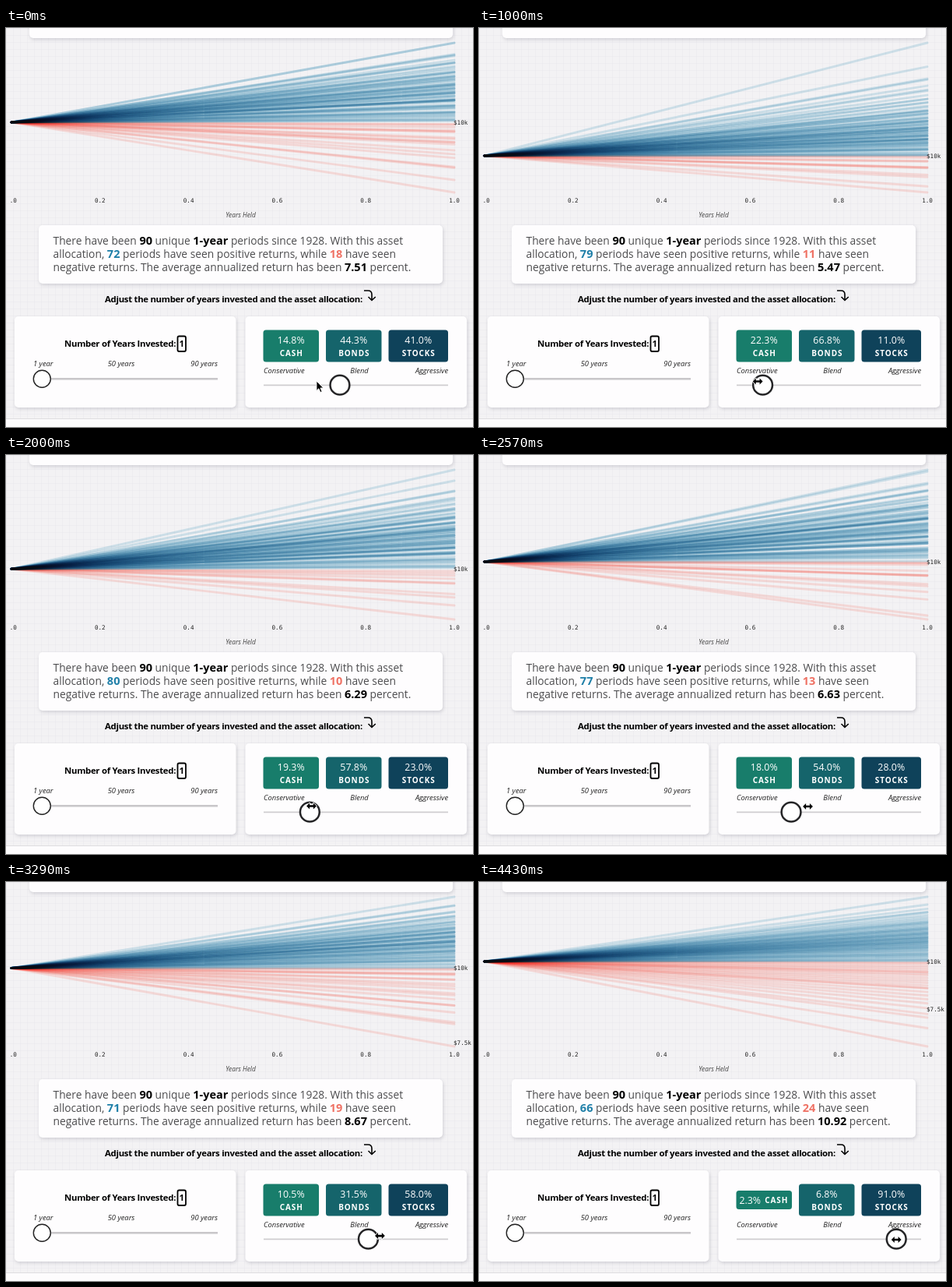
An HTML page for the animation above (4.57 s loop, 600x512 px).

```html
<!DOCTYPE html>
<html lang="en">
<head>
<meta charset="utf-8">
<title>Returns by asset allocation</title>
<style>
html, body { margin: 0; width: 100%; height: 100%; overflow: hidden; background: #f3f2f4; }
svg { display: block; width: 600px; height: 512px; font-family: "Open Sans", "Noto Sans", sans-serif; }
text { white-space: pre; }
.card { fill: #fefdfe; filter: drop-shadow(1px 2px 2px rgba(40, 40, 60, .16)); }
.mono { font: 7.6px "DejaVu Sans Mono", monospace; fill: #222; }
.ital { font-size: 9.4px; font-style: italic; fill: #222; }
.head { font-size: 11.4px; font-weight: 700; letter-spacing: -.3px; }
.para { font-size: 13.8px; fill: #4c4c4e; }
.para tspan { font-size: 14.5px; font-weight: 700; fill: #000; }
.para .up { fill: #1f7fa8; }
.para .down { fill: #ef7265; }
.mid { text-anchor: middle; }
.end { text-anchor: end; }
.pct { font-size: 12.4px; fill: #fff; text-anchor: middle; }
.name { font-size: 10px; font-weight: 700; letter-spacing: .9px; fill: #fff; text-anchor: middle; }
.ray { mix-blend-mode: multiply; fill: none; stroke-width: 2.9; stroke-linecap: round; stroke-opacity: .18; }
.ink { fill: none; stroke: #000; stroke-width: 1.6; }
</style>
</head>
<body>
<svg viewBox="0 0 600 512">
  <defs>
    <pattern id="grid" width="9" height="9" patternUnits="userSpaceOnUse">
      <path d="M0 .5H9M.5 0V9" stroke="#667" stroke-opacity=".03" fill="none"/>
    </pattern>
    <clipPath id="edge"><rect x="5" y="210" width="595" height="20"/></clipPath>
  </defs>
  <rect width="600" height="512" fill="#f3f2f4"/>
  <rect width="600" height="502" fill="url(#grid)"/>
  <rect y="502" width="600" height="10" fill="#fdfcfd"/>
  <path d="M0 501.5H600" stroke="#dedde0"/>

  <g id="rays"></g>
  <g id="axis" class="mono mid" clip-path="url(#edge)"></g>
  <text id="base" class="mono" x="575">$10k</text>
  <text id="low" class="mono" x="575">$7.5k</text>
  <text class="ital mid" x="301.5" y="243" style="font-size:8.4px;fill:#444">Years Held</text>

  <rect class="card" x="30" y="-20" width="544" height="33" rx="5"/>
  <rect class="card" x="42" y="253" width="519" height="75" rx="5"/>
  <rect class="card" x="11" y="370" width="284.5" height="117" rx="5"/>
  <rect class="card" x="307.5" y="370" width="284.5" height="117" rx="5"/>

  <g class="para">
    <text x="60.5" y="278">There have been <tspan>90</tspan> unique <tspan>1-year</tspan> periods since 1928. With this asset</text>
    <text x="60.5" y="295">allocation, <tspan id="up" class="up"></tspan> periods have seen positive returns, while <tspan id="down" class="down"></tspan> have seen</text>
    <text x="60.5" y="312">negative returns. The average annualized return has been <tspan id="avg"></tspan> percent.</text>
  </g>

  <text class="head" x="127" y="351.5">Adjust the number of years invested and the asset allocation:</text>
  <path class="ink" d="M460 337H465Q470 337 470 342V349M465.5 345L470 349.5L474.8 345"/>

  <text class="head" x="75" y="409">Number of Years Invested:</text>
  <rect class="ink" x="220.5" y="395.5" width="10.5" height="19.5" rx="2" style="stroke-width:1.8"/>
  <text class="head mid" x="225.7" y="409">1</text>
  <text class="ital" x="35" y="434">1 year</text>
  <text class="ital mid" x="148" y="434">50 years</text>
  <text class="ital end" x="272" y="434">90 years</text>
  <path d="M36 450.3H272" stroke="#c8c6c9" stroke-width="2.4"/>
  <circle cx="46.3" cy="450.2" r="11" fill="#fff" stroke="#222" stroke-width="1.4"/>

  <g id="tiles"></g>
  <text class="ital" x="331" y="442.5">Conservative</text>
  <text class="ital mid" x="454" y="442.5">Blend</text>
  <text class="ital end" x="568" y="442.5">Aggressive</text>
  <path d="M331 458.3H568" stroke="#cfcdd0" stroke-width="1.7"/>
  <circle id="knob" cy="458.2" r="12.4" fill="#fff" stroke="#252527" stroke-width="2.5"/>

  <path id="arrow" d="M0 0V12.5L2.9 9.8L5 14.6L7.2 13.6L5.1 9H9Z" stroke="#fff" stroke-width="1" stroke-linejoin="round"/>
  <path id="resize" d="M-6.4 0L-2.4 -4V-1.3H2.4V-4L6.4 0L2.4 4V1.3H-2.4V4Z" stroke="#fff" stroke-width="1.6" paint-order="stroke" stroke-linejoin="round"/>
</svg>
<script>
const LOOP = 4570, FRAMES = 32, COUNT = 90;
const BLUE = '#1c8ab4', RED = '#fb6555';
const TOP = 19, BOTTOM = 211, LEFT = 7, RIGHT = 576;

// Stock share and pointer height by step.
const share = [[0, 41], [1, 27], [4, 18], [5, 18], [8, 8], [10, 6], [11, 20], [14, 23],
  [18, 28], [19, 38], [23, 58], [24, 65], [31, 91]];
const height = [[0, 453], [4, 457], [10, 450], [18, 451], [31, 459]];
// Height of the $10k line and number of gains by stock share.
const baseline = [[6, 170], [18, 155.5], [28, 137], [41, 121], [58, 110.5], [91, 102]];
const gains = [[6, 79], [18, 80], [23, 80], [28, 77], [41, 72], [58, 71], [91, 66]];

const $ = id => document.getElementById(id);
const set = (el, attrs) => { for (const k in attrs) el.setAttribute(k, attrs[k]); return el; };
const add = (parent, tag, attrs, text = '') => {
  const el = set(document.createElementNS('http://www.w3.org/2000/svg', tag), attrs);
  el.textContent = text;
  return parent.appendChild(el);
};
const lerp = (pts, x) => {
  let i = 1;
  while (i < pts.length - 1 && pts[i][0] < x) i++;
  const [x0, y0] = pts[i - 1], [x1, y1] = pts[i];
  return y0 + (y1 - y0) * Math.min(1, (x - x0) / (x1 - x0));
};
const shareAt = step => Math.round(lerp(share, step));
const knobX = s => 341 + 2.145 * s;

// Yearly returns: skewed bell curves, with bond ranks shuffled against stock ranks.
const bell = rank => {
  const p = (rank + .5) / COUNT;
  return 4.91 * (p ** .14 - (1 - p) ** .14);
};
const stockReturn = z => 14 + z * (z > 0 ? 15.5 : 23);
const bondReturn = z => 3.3 + 5 * z + z * z * (z > 0 ? 2.6 : -.5);
const years = Array.from({ length: COUNT }, (_, i) => ({
  stock: stockReturn(bell(i)),
  bond: bondReturn(bell((i * 13 + 58) % COUNT)),
  ray: add($('rays'), 'path', { class: 'ray' })
}));

for (let i = 0; i < 6; i++) {
  add($('axis'), 'text', { x: LEFT + 113.8 * i, y: 223.5 }, (i / 5).toFixed(1));
}
const tiles = [
  ['CASH', 330.5, 71.5, '#187d6b'],
  ['BONDS', 411, 71.5, '#15646b'],
  ['STOCKS', 491.5, 76.5, '#0f425a']
].map(([name, x, w, fill]) => {
  const g = $('tiles'), mid = x + w / 2;
  return {
    mid,
    box: add(g, 'rect', { x, width: w, rx: 3.5, fill }),
    pct: add(g, 'text', { class: 'pct' }),
    name: add(g, 'text', { class: 'name' }, name)
  };
});

function drawTile(tile, value, oneLine) {
  const { mid, box, pct, name } = tile;
  set(box, oneLine ? { y: 396, height: 24 } : { y: 387.5, height: 41 });
  set(pct, oneLine ? { x: mid - 18, y: 412.5 } : { x: mid, y: 404.5 });
  set(name, oneLine ? { x: mid + 16, y: 412 } : { x: mid + .5, y: 421 });
  pct.textContent = value.toFixed(1) + '%';
}

function drawChart(s, b, c) {
  const zero = lerp(baseline, s), up = Math.round(lerp(gains, s));
  const mix = years.map(y => y.stock * s + y.bond * b);
  const sorted = [...mix].sort((p, q) => q - p);
  const even = (sorted[up - 1] + sorted[up]) / 2;
  const best = sorted[0] - even, worst = sorted[COUNT - 1] - even;
  years.forEach(({ ray }, i) => {
    const v = mix[i] - even;
    const end = v > 0 ? zero + (TOP - zero) * v / best : zero + (BOTTOM - zero) * v / worst;
    set(ray, { d: `M${LEFT} ${zero}L${RIGHT} ${end}`, stroke: v > 0 ? BLUE : RED });
  });

  // The value axis is logarithmic and ends at the worst year.
  const floor = Math.log(.9866 - .00425 * s);
  const low = zero + (BOTTOM - zero) * Math.log(.75) / floor;
  set($('base'), { y: zero + 2.8 });
  set($('low'), { y: low + 2.8, visibility: low <= BOTTOM ? 'visible' : 'hidden' });
  $('up').textContent = up;
  $('down').textContent = COUNT - up;
  $('avg').textContent = ((11.53 * s + 5.15 * b + 3.44 * c) / 100).toFixed(2);
}

function draw(step) {
  const s = shareAt(step), c = (100 - s) / 4, b = 3 * c;
  drawChart(s, b, c);
  drawTile(tiles[0], c, c < 9.95);
  drawTile(tiles[1], b, false);
  drawTile(tiles[2], s, false);
  set($('knob'), { cx: knobX(s) });
  // The knob trails the pointer by one step.
  const transform = `translate(${knobX(shareAt(step + 1))} ${lerp(height, step)})`;
  set($('arrow'), { transform, visibility: step ? 'hidden' : 'visible' });
  set($('resize'), { transform, visibility: step ? 'visible' : 'hidden' });
}

const startOf = step => Math.round(step * 100 / 7) * 10;
let shown = -1;
function tick() {
  const t = performance.now() % LOOP;
  let step = FRAMES - 1;
  while (startOf(step) > t) step--;
  if (step !== shown) draw(shown = step);
  requestAnimationFrame(tick);
}
tick();
</script>
</body>
</html>
```
